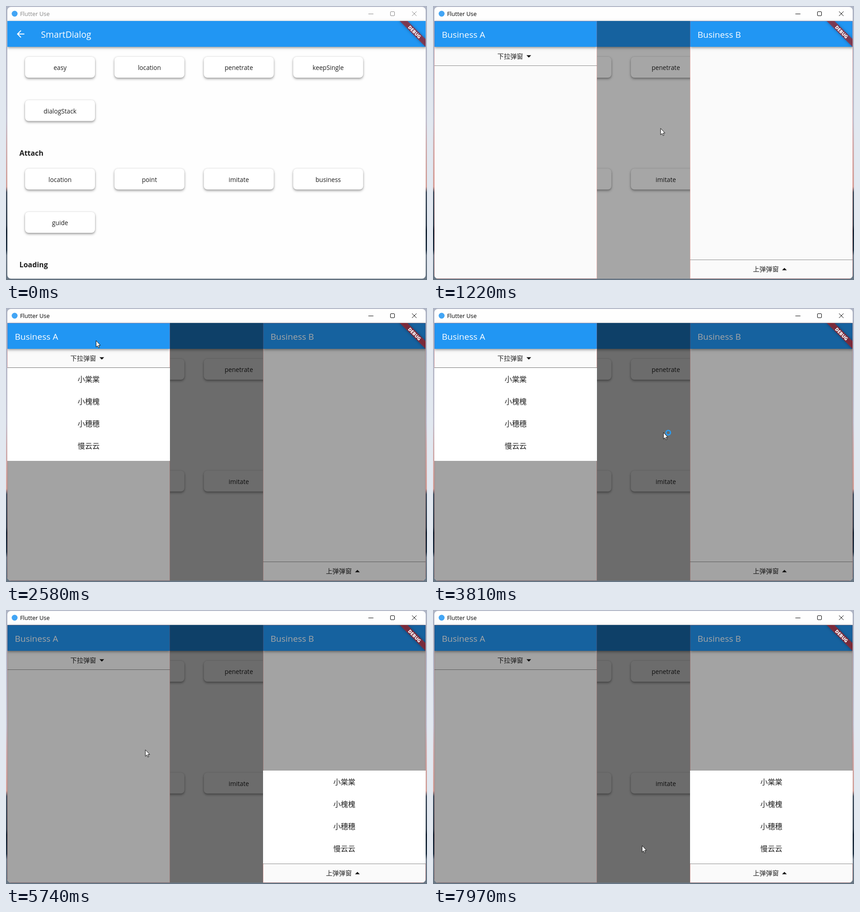
An HTML page with a canvas that plays this animation: 927x604 px, repeating every 8000 ms.

```html
<!DOCTYPE html>
<html lang="zh">
<head>
<meta charset="utf-8">
<title>SmartDialog</title>
<style>
  html, body { margin: 0; width: 100%; height: 100%; overflow: hidden; }
  canvas { display: block; }
</style>
</head>
<body>
<canvas id="stage" width="927" height="604"></canvas>
<script>
const ctx = document.getElementById('stage').getContext('2d');
const LOOP = 8000, FADE = 260, MASK = 0.35;
const LATIN = '"Open Sans", "Noto Sans", sans-serif';
const CJK = '"Noto Sans CJK SC", "Noto Sans CJK JP", "Noto Sans CJK", sans-serif';
const WIN = { x: 3, y: 2, w: 921, h: 599, top: 33, bottom: 601, right: 924 };
const BLUE = '#2196f3';
const ITEMS = ['小棠棠', '小槐槐', '小穗穗', '慢云云'];
const SECTIONS = [
  [112, ['easy', 'location', 'penetrate', 'keepSingle']],
  [207.5, ['dialogStack']],
  [358.5, ['location', 'point', 'imitate', 'business']],
  [454, ['guide']],
];
const ARROW_BACK = new Path2D('M20 11H7.83l5.59-5.59L12 4l-8 8 8 8 1.41-1.41L7.83 13H20z');
const POINTER = new Path2D('M.5 .5V14.8L3.7 11.8 5.9 16.6 8 15.7 5.9 10.9H10.2Z');

// Pointer path: time, x, y
const TRACK = [
  [60, 745, 600], [480, 689, 366], [920, 689, 366], [1640, 191, 110], [2230, 191, 110],
  [2560, 200, 72], [2760, 130, 50], [2960, 234, 42], [3160, 145, 70], [3370, 230, 60],
  [3760, 507, 274], [3860, 507, 274], [4080, 560, 400], [4240, 560, 400],
  [4800, 743, 590], [5330, 743, 590], [5700, 330, 330], [5940, 26, 42],
  [6220, 794, 471], [6260, 794, 471], [6450, 780, 576], [6650, 902, 300],
  [6850, 860, 46], [7120, 690, 300], [7300, 850, 480], [7480, 777, 588],
  [7520, 777, 586], [7950, 460, 519], [8000, 460, 519],
];

const clamp = v => Math.max(0, Math.min(1, v));
const progress = (t, start) => clamp((t - start) / FADE);
const easeOut = p => 1 - (1 - p) ** 1.55;

function rect(x, y, w, h, fill) {
  ctx.fillStyle = fill;
  ctx.fillRect(x, y, w, h);
}

function text(str, x, y, font, fill, align = 'left') {
  ctx.font = font;
  ctx.fillStyle = fill;
  ctx.textAlign = align;
  ctx.fillText(str, x, y);
}

function line(x1, y1, x2, y2) {
  ctx.beginPath();
  ctx.moveTo(x1, y1);
  ctx.lineTo(x2, y2);
  ctx.stroke();
}

function scoped(draw) {
  ctx.save();
  draw();
  ctx.restore();
}

function clipRect(x, y, w, h) {
  ctx.beginPath();
  ctx.rect(x, y, w, h);
  ctx.clip();
}

function shadow(color, blur, dy) {
  ctx.shadowColor = color;
  ctx.shadowBlur = blur;
  ctx.shadowOffsetY = dy;
}

function drawDesktop() {
  const sky = ctx.createLinearGradient(0, 0, 0, 604);
  [[0, '#aeb4c4'], [0.42, '#c3c2d0'], [0.5, '#d0b3b6'], [0.66, '#d3a39d'], [0.68, '#4b5868'],
   [0.8, '#394655'], [0.82, '#1d2a3a'], [0.89, '#26384a'], [0.91, '#75808e'], [1, '#687684']]
    .forEach(([at, color]) => sky.addColorStop(at, color));
  rect(0, 0, 927, 604, sky);
}

function drawTitleBar(active) {
  const ink = active ? '#000' : '#868686';
  rect(WIN.x, WIN.y, WIN.w, 31, '#fefefe');
  ctx.beginPath();
  ctx.arc(19, 17, 6.5, 0, 7);
  ctx.fillStyle = '#42a5f5';
  ctx.fill();
  text('Flutter Use', 31, 22, `12.8px ${LATIN}`, ink);
  ctx.strokeStyle = ink;
  ctx.lineWidth = 1;
  line(798, 17.5, 809, 17.5);
  ctx.beginPath();
  ctx.roundRect(846.5, 12.5, 9, 9, 1.5);
  ctx.stroke();
  line(894, 12, 904, 22);
  line(904, 12, 894, 22);
}

function drawAppBar(x, w) {
  scoped(() => {
    shadow('rgba(0,0,0,.42)', 6, 2);
    rect(x, 33, w, 57, BLUE);
  });
}

function drawButton(x, y, label) {
  scoped(() => {
    ctx.fillStyle = '#fff';
    ctx.beginPath();
    ctx.roundRect(x, y, 154, 46, 8);
    shadow('rgba(0,0,0,.16)', 3, 0);
    ctx.fill();
    shadow('rgba(0,0,0,.34)', 5, 3);
    ctx.fill();
  });
  text(label, x + 77, y + 29, `13.7px ${LATIN}`, '#1f1f1f', 'center');
}

function drawPage() {
  rect(WIN.x, WIN.top, WIN.w, 568, '#fefefe');
  for (const [y, labels] of SECTIONS)
    labels.forEach((label, i) => drawButton(42 + 196.8 * i, y, label));
  text('Attach', 29.5, 330, `700 15.9px ${LATIN}`, '#1c1c1c');
  text('Loading', 29.5, 576, `700 15.9px ${LATIN}`, '#1c1c1c');
  drawAppBar(WIN.x, WIN.w);
  text('SmartDialog', 77, 70, `19.3px ${LATIN}`, '#fff');
  scoped(() => {
    ctx.translate(19.8, 49.3);
    ctx.scale(1.03, 1.03);
    ctx.fillStyle = '#fff';
    ctx.fill(ARROW_BACK);
  });
}

function drawTrigger(label, x, y, dir) {
  text(label, x, y + 5.3, `300 14.2px ${CJK}`, '#222');
  ctx.beginPath();
  ctx.moveTo(x + 64, y - 2.5 * dir);
  ctx.lineTo(x + 74.4, y - 2.5 * dir);
  ctx.lineTo(x + 69.2, y + 2.7 * dir);
  ctx.fillStyle = '#111';
  ctx.fill();
}

function drawPanel(x, title, drawRow) {
  scoped(() => {
    clipRect(x, 33, 358, 568);
    rect(x, 33, 358, 568, '#fafafa');
    drawRow();
    drawAppBar(x, 358);
    text(title, x + 16.5, 70, `19px ${LATIN}`, '#fff');
    ctx.strokeStyle = 'rgba(244,67,54,.4)';
    ctx.lineWidth = 1.4;
    ctx.strokeRect(x, 33, 358, 568);
  });
}

function drawDialogs(scale) {
  if (!scale) return;
  scoped(() => {
    ctx.translate(463.5, 317);
    ctx.scale(scale, scale);
    ctx.translate(-463.5, -317);
    drawPanel(3, 'Business A', () => {
      rect(3, 131, 358, 1, '#8c8c8c');
      drawTrigger('下拉弹窗', 141.8, 111, 1);
    });
    drawPanel(566, 'Business B', () => {
      rect(566, 559, 358, 1, '#8c8c8c');
      drawTrigger('上弹弹窗', 704.6, 580, -1);
    });
  });
}

// Dims the window, leaving an optional rectangle untouched.
function drawMask(amount, hole) {
  if (!amount) return;
  ctx.beginPath();
  ctx.rect(WIN.x, WIN.top, WIN.w, 568);
  if (hole) ctx.rect(...hole);
  ctx.fillStyle = `rgba(0,0,0,${MASK * amount})`;
  ctx.fill('evenodd');
}

// The list unfolds from its edge while its content stays centred in the opening.
function drawList(x, edge, dir, amount) {
  if (!amount) return;
  const full = 205, height = full * amount;
  const top = dir > 0 ? edge : edge - height;
  const contentTop = top + (height - full) / 2;
  scoped(() => {
    clipRect(x, top, 358, height);
    rect(x, top, 358, height, '#fff');
    ITEMS.forEach((item, i) =>
      text(item, x + 179, contentTop + 31 + 49 * i, `300 16.2px ${CJK}`, '#222', 'center'));
  });
}

function drawBanner() {
  scoped(() => {
    clipRect(WIN.x, WIN.top, WIN.w, 568);
    ctx.translate(WIN.right, WIN.top);
    ctx.rotate(Math.PI / 4);
    scoped(() => {
      shadow('rgba(0,0,0,.5)', 6, 0);
      rect(-41, 28.3, 82, 12.2, 'rgba(183,28,28,.63)');
    });
    text('DEBUG', 0, 38.2, `800 10.2px ${LATIN}`, '#fff', 'center');
  });
}

function pointerAt(t) {
  const next = TRACK.findIndex(key => key[0] > t);
  const [t0, x0, y0] = TRACK[next - 1], [t1, x1, y1] = TRACK[next];
  const p = (t - t0) / (t1 - t0), s = p * p * (3 - 2 * p);
  return [x0 + (x1 - x0) * s, y0 + (y1 - y0) * s];
}

function drawPointer(t) {
  if (t < TRACK[0][0]) return;
  scoped(() => {
    ctx.translate(...pointerAt(t));
    ctx.fillStyle = '#fff';
    ctx.strokeStyle = '#111';
    ctx.lineWidth = 1;
    ctx.fill(POINTER);
    ctx.stroke(POINTER);
    if (t > 3700 && t < 3920) {
      ctx.beginPath();
      ctx.arc(11, 0.8, 5, 0, 7);
      ctx.strokeStyle = '#279df5';
      ctx.lineWidth = 2.8;
      ctx.stroke();
    }
  });
}

function render(t) {
  const dialog = progress(t, 714);
  const dropOpen = progress(t, 1933), dropClose = 1 - progress(t, 4140);
  const rise = progress(t, 5230);

  drawDesktop();
  scoped(() => {
    ctx.beginPath();
    ctx.roundRect(WIN.x, WIN.y, WIN.w, WIN.h, 8);
    ctx.clip();
    drawTitleBar(t >= 600);
    drawPage();
    drawMask(dialog);
    drawDialogs(easeOut(dialog));
    drawMask(Math.min(dropOpen, dropClose), [3, 33, 358, 98.5]);
    drawList(3, 132, 1, easeOut(Math.min(dropOpen, dropClose)));
    drawMask(rise, [566, 559, 358, 42]);
    drawList(566, 559, -1, easeOut(rise));
    drawBanner();
  });
  drawPointer(t);
}

function tick(now) {
  ctx.clearRect(0, 0, 927, 604);
  render(now % LOOP);
  requestAnimationFrame(tick);
}
requestAnimationFrame(tick);
</script>
</body>
</html>
```
